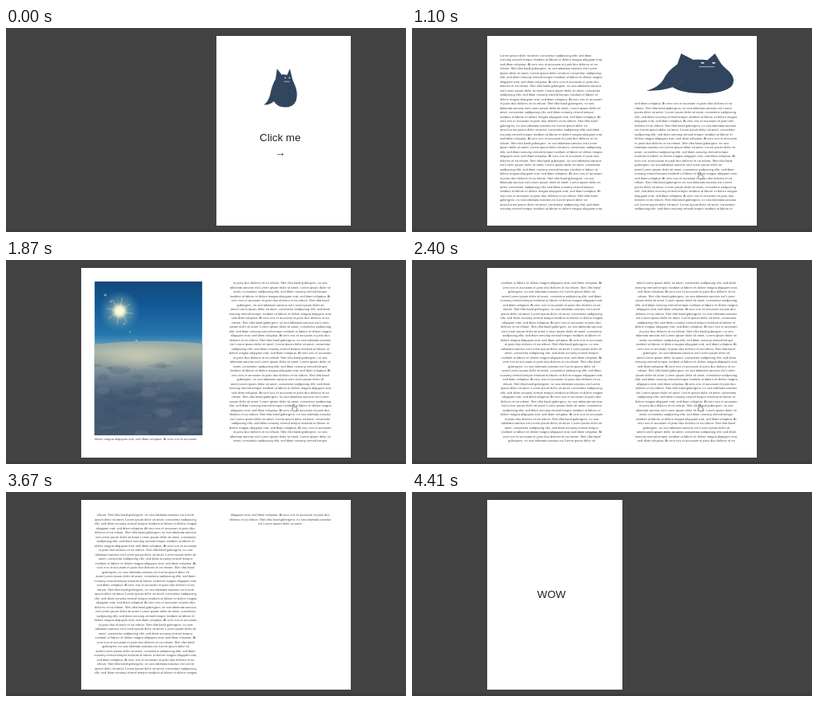
An HTML page with a canvas that plays this animation: 500x256 px, repeating every 5.11 s.

```html
<!DOCTYPE html>
<html lang="en">
<head>
<meta charset="utf-8">
<title>Page flip</title>
<style>
html, body { margin: 0; width: 100%; height: 100%; overflow: hidden; background: #424242; }
canvas { display: block; }
</style>
</head>
<body>
<canvas id="stage" width="500" height="256"></canvas>
<script>
const ctx = document.getElementById('stage').getContext('2d');
const LOOP = 5110, SPINE = 263, PAGE_W = 169, TOP = 10, PAGE_H = 238;
const LEFT = 174.4, RIGHT = 342.8; // text column centres
const EM = 3.98, LEADING = 5.5, COLUMN = 32.4 * EM;
const FONT = '"Liberation Sans", Arial, sans-serif';
const NAVY = '#31465e';

// Text is set at ten times its size and scaled down, so that widths stay linear.
function write(text, x, baseline, size, align = 'center', colour = '#222') {
  ctx.save();
  ctx.translate(x, baseline);
  ctx.scale(.1, .1);
  ctx.font = `${size * 10}px ${FONT}`;
  ctx.textAlign = align;
  ctx.fillStyle = colour;
  ctx.fillText(text, 0, 0);
  ctx.restore();
}

function fill(path, colour) {
  ctx.fillStyle = colour;
  ctx.fill(new Path2D(path));
}

function stroke(path, colour, width) {
  ctx.strokeStyle = colour;
  ctx.lineWidth = width;
  ctx.stroke(new Path2D(path));
}

function ellipse(x, y, rx, ry, colour) {
  ctx.fillStyle = colour;
  ctx.beginPath();
  ctx.ellipse(x, y, rx, ry, 0, 0, 7);
  ctx.fill();
}

function shade(gradient, stops) {
  for (const [at, colour] of stops) gradient.addColorStop(at, colour);
  return gradient;
}

// Running text, wrapped once and shared out over the pages
const paragraph = 'Lorem ipsum dolor sit amet, consetetur sadipscing elitr, sed diam nonumy eirmod ' +
  'tempor invidunt ut labore et dolore magna aliquyam erat, sed diam voluptua. At vero eos et ' +
  'accusam et justo duo dolores et ea rebum. Stet clita kasd gubergren, no sea takimata sanctus ' +
  'est Lorem ipsum dolor sit amet.';
const block = Array(4).fill(paragraph).join(' ');
const story = block.repeat(12) + paragraph + ' ' + paragraph;

function wrap(text) {
  const lines = [];
  let line = '';
  ctx.font = `${EM * 10}px ${FONT}`;
  for (const word of text.split(' ')) {
    const longer = line ? line + ' ' + word : word;
    if (ctx.measureText(longer).width > COLUMN * 10) {
      lines.push(line);
      line = word;
    } else line = longer;
  }
  return [...lines, line];
}
const lines = wrap(story);

function column(centre, first, count, row, align = 'center') {
  const x = align === 'left' ? centre - COLUMN / 2 : centre;
  lines.slice(first, first + count).forEach((line, i) =>
    write(line, x, 30 + (row + i) * LEADING, EM, align, '#4c4c4c'));
}

// The cat is drawn in a box of 42 by 48.5.
function cat(x, y, w, h) {
  ctx.save();
  ctx.translate(x, y);
  ctx.scale(w / 42, h / 48.5);
  fill('M14.7 13L16.5 0 22.2 7.5Q26 7 29 8L32.6 0 34.9 10Q36 15 39 21 43 31 40.4 40 ' +
    '37 48.5 27 48.5 17 48.5 12.4 41 8 45.5 0 45.5 6 41 8 32 10 21 14.7 13Z', NAVY);
  stroke('M12.4 41Q17 36 18 29', '#4b607755', .6);
  ellipse(26.7, 11.5, .9, .8, '#fff');
  ellipse(32, 11.5, .9, .8, '#fff');
  stroke('M25 16.2H32.3', '#c3cbd4', .8);
  ctx.restore();
}

function skyPicture() {
  const x = 110.5, y = 27, w = 135, h = 193;
  let seed = 7;
  const random = () => (seed = seed * 16807 % 2147483647) / 2147483647;
  ctx.save();
  ctx.beginPath();
  ctx.rect(x, y, w, h);
  ctx.clip();
  ctx.fillStyle = shade(ctx.createLinearGradient(0, y, 0, 106),
    [[0, '#14497a'], [.4, '#115a98'], [.85, '#2877ae'], [1, '#5a9bbd']]);
  ctx.fillRect(x, y, w, h);
  fill('M110 106Q175 98 246 105V221H110Z', shade(ctx.createLinearGradient(0, 101, 0, 220),
    [[0, '#93a8a9'], [.12, '#aab5a8'], [.3, '#82949b'], [.48, '#566b81'], [.65, '#435871'], [1, '#475a72']]));
  for (let i = 0; i < 60; i++) {
    const cy = 132 + random() * 88;
    ellipse(x + random() * w, cy, 4 + random() * 12, 1.5 + random() * 4,
      random() < .65 ? '#344a6630' : '#8c9aa226');
  }
  ctx.save();
  ctx.translate(165, 121);
  ctx.scale(1, .3);
  ctx.fillStyle = shade(ctx.createRadialGradient(0, 0, 5, 0, 0, 60), [[0, '#d3d2b6b0'], [1, '#d3d2b600']]);
  ctx.fillRect(-60, -60, 120, 120);
  ctx.restore();
  ctx.fillStyle = shade(ctx.createRadialGradient(142, 64, 1, 142, 64, 26),
    [[0, '#fffff0'], [.18, '#eef0d2'], [.4, '#a9c6ae80'], [1, '#6fa4b000']]);
  ctx.fillRect(x, y, w, 75);
  for (let i = 0; i < 8; i++) {
    const a = i * Math.PI / 4 + .2;
    stroke(`M142 64l${17 * Math.cos(a)} ${17 * Math.sin(a)}`, '#f4f6dc80', .8);
  }
  for (const [fx, fy, r] of [[124, 44, 1.6], [131, 52, 1.2], [148, 80, 1.2], [155, 90, 1], [163, 101, 1.3]])
    ellipse(fx, fy, r, r, '#a9d2b4b0');
  ctx.restore();
}

// Even pages lie on the right, odd ones on the left.
const pages = [
  () => {
    cat(322.3, 51, 42, 48.5);
    write('Click me', RIGHT, 142.4, 13.4);
    write('→', RIGHT, 161.2, 13.4);
  },
  () => column(LEFT, 0, 36, 1, 'left'),
  () => { cat(293, 32, 110.5, 50); column(RIGHT, 36, 25, 12, 'left'); },
  () => { skyPicture(); column(LEFT, 61, 1, 35.7); },
  () => column(RIGHT, 62, 37, 0),
  () => column(LEFT, 99, 37, 0),
  () => column(RIGHT, 136, 37, 0),
  () => column(LEFT, 173, 37, 0),
  () => column(RIGHT, 210, 3, 0),
  () => write('WOW', LEFT, 133, 13.4)
];

function drawPage(index, scale = 1) {
  if (!pages[index]) return;
  ctx.save();
  ctx.translate(SPINE, 0);
  ctx.scale(scale, 1);
  ctx.translate(-SPINE, 0);
  ctx.fillStyle = '#fff';
  ctx.fillRect(index % 2 ? SPINE - PAGE_W : SPINE, TOP, index % 2 ? PAGE_W : PAGE_W - 1, PAGE_H);
  pages[index]();
  ctx.restore();
}

// Start, end and the angle held at each step of a turn
const TURN = [50, 120, 180];
const turns = [
  [940, 1100, TURN],
  [1710, 1870, TURN],
  [2250, 2400, TURN],
  [3010, 3090, [100, 180]],
  [4050, 4200, TURN]
];

// Value of a stepped motion at time t, undefined before it starts
function held(t, start, end, values) {
  if (t < start) return undefined;
  const i = Math.floor((t - start) * (values.length - 1) / (end - start));
  return values[Math.min(i, values.length - 1)];
}

function drawBook(t) {
  let spread = 0, angle = 0;
  for (const turn of turns) {
    const a = held(t, ...turn) || 0;
    if (a === 180) spread++;
    else angle += a;
  }
  const right = spread * 2;
  drawPage(right - 1);
  if (!angle) return drawPage(right);
  drawPage(right + 2);
  const scale = Math.cos(angle * Math.PI / 180);
  if (scale > 0) drawPage(right, scale);
  else drawPage(right + 1, -scale);
}

function drawHand(x, y) {
  const hand = 'M1.9 6V1.2Q2.6.2 3.3 1.2V4L6.3 4.8Q7 5 6.9 6L6.2 9.5H2.8L.4 6.6Q.6 5.4 1.9 6Z';
  ctx.save();
  ctx.translate(x, y);
  fill(hand, '#fff');
  stroke(hand, '#555', .6);
  ctx.restore();
}

// The hand stays over the book for four turns, leaves, and dips in again for the last one.
function drawCursor(t) {
  if (t >= 260 && t < 3670) {
    const away = 1 - held(t, 260, 480, [0, .55, .9, 1]);
    const out = held(t, 3310, 3670, [.05, .2, .45, .75, 1, 1]) || 0;
    drawHand(357 + 55 * away + 127 * out, 180 + 50 * away + 70 * out);
  } else if (t >= 3910 && t < 4410) {
    const away = held(t, 3910, 4410, [1, .4, .1, 0, 0, .2, .6, 1]);
    drawHand(375 + 60 * away, 195 + 42 * away);
  }
}

function frame() {
  const t = performance.now() % LOOP;
  ctx.fillStyle = '#424242';
  ctx.fillRect(0, 0, 500, 256);
  ctx.fillStyle = '#403a3c';
  ctx.fillRect(0, 253, 500, 3);
  drawBook(t);
  drawCursor(t);
  requestAnimationFrame(frame);
}
frame();
</script>
</body>
</html>
```
